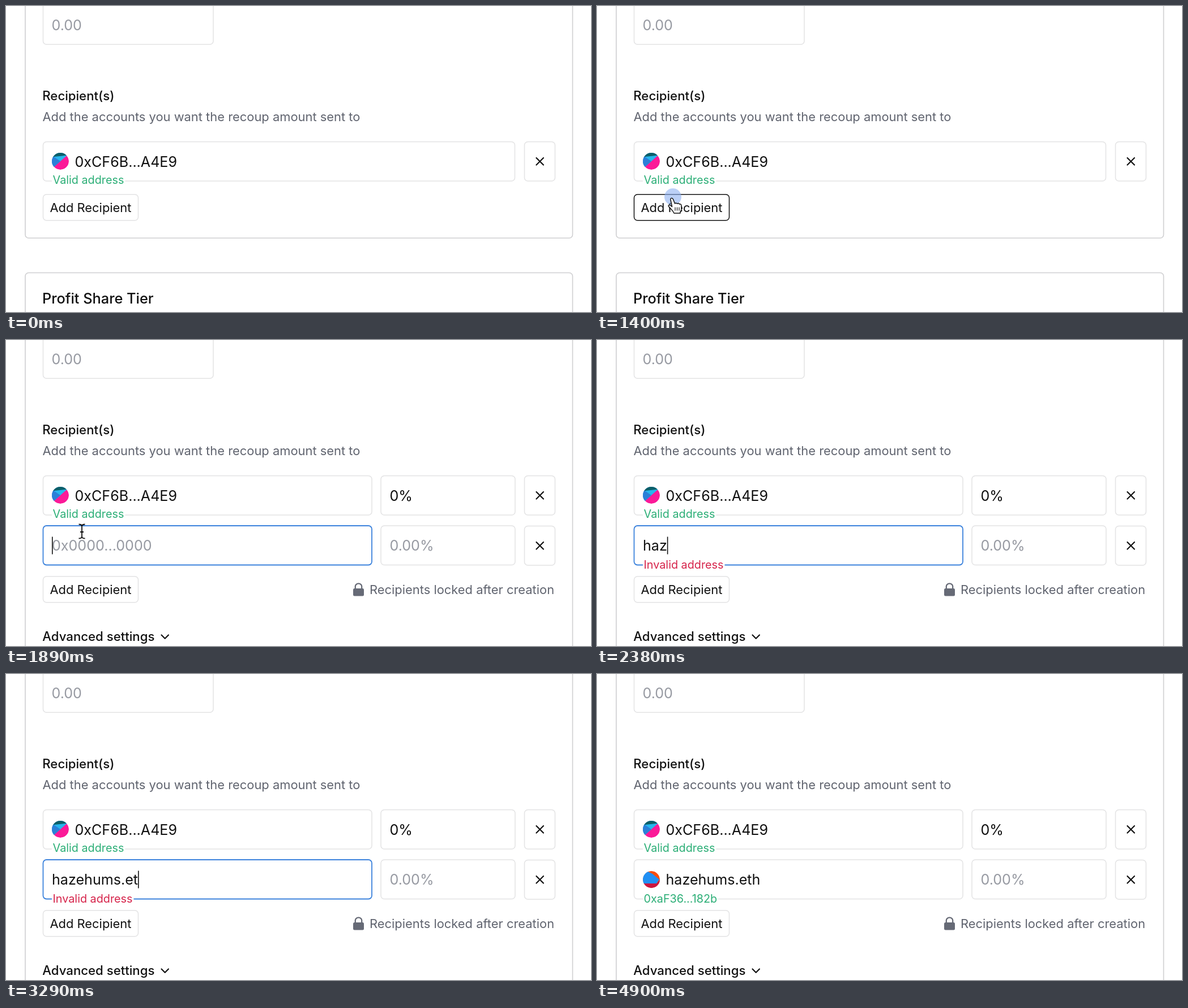
Animation, 1033 px wide and 542 px high, one loop 4.97 s. Source, as an HTML page:

```html
<!DOCTYPE html>
<html lang="en">
<head>
<meta charset="utf-8">
<title>Add recipient</title>
<style>
  html, body { margin: 0; width: 100%; height: 100%; overflow: hidden; background: #fff; }
  svg { display: block; width: 100%; height: 100%; font-family: Inter, sans-serif; }
  text { white-space: pre; fill: #111; }
  .body { font-size: 21.9px; }
  .input { font-size: 25.1px; }
  .label { font-size: 22.2px; font-weight: 500; }
  .title { font-size: 25.3px; font-weight: 500; }
  .hint { font-size: 19.8px; }
  .muted { fill: #60646f; }
  .placeholder { fill: #989ba3; }
  .box { fill: #fff; stroke: #e3e3e4; stroke-width: 1.5; }
  .card { fill: none; stroke: #cfcfd1; stroke-width: 1.6; }
  .icon { fill: none; stroke: #111; stroke-width: 2.2; stroke-linecap: round; stroke-linejoin: round; }
</style>
</head>
<body>
<svg id="stage" viewBox="0 0 1033 542" preserveAspectRatio="none">
  <defs>
    <clipPath id="disc"><circle r="15"/></clipPath>
  </defs>
</svg>
<script>
const LOOP = 4970, STEP = 70;
const NAME = 'hazehums.eth';
const ENTER = 700, ARRIVE = 1190, PRESS = 1330, RELEASE = 1540;
const TYPE_START = 2100, KEY_TIME = 114, RESOLVED = 3640;
const GREEN = '#2bae76', RED = '#d6244b', BLUE = '#3b82dc';

const stage = document.getElementById('stage');

function add(parent, tag, attrs = {}, content) {
  const node = document.createElementNS('http://www.w3.org/2000/svg', tag);
  for (const key in attrs) node.setAttribute(key, attrs[key]);
  if (content !== undefined) node.textContent = content;
  parent.append(node);
  return node;
}
const group = (parent = stage, x = 0, y = 0) => add(parent, 'g', { transform: `translate(${x} ${y})` });
const text = (parent, x, y, style, content) => add(parent, 'text', { x, y, class: style }, content);
const box = (parent, x, y, width, height, style = 'box') =>
  add(parent, 'rect', { x, y, width, height, rx: 6, class: style });
const show = (node, visible) => node.setAttribute('display', visible ? 'inline' : 'none');

function removeButton(parent, y) {
  box(parent, 915.5, y, 54, 69.5);
  add(parent, 'path', { d: `M936.5 ${y + 28.5}l12.5 12.5m0 -12.5l-12.5 12.5`, class: 'icon' });
}

function avatar(parent, x, y, base, shapes) {
  const disc = add(group(parent, x, y), 'g', { 'clip-path': 'url(#disc)' });
  add(disc, 'circle', { r: 15, fill: base });
  for (const [d, fill] of shapes) add(disc, 'path', { d, fill });
}

// A status line that interrupts the lower border of its input.
function hint(parent, y) {
  const cover = add(parent, 'rect', { x: 81, y: y - 12, height: 14, fill: '#fff' });
  const label = text(parent, 82.5, y, 'hint', '');
  return (content, color) => {
    label.textContent = content;
    label.style.fill = color;
    cover.setAttribute('width', content ? label.getComputedTextLength() + 3.5 : 0);
  };
}

function addButton(parent, y) {
  const frame = box(parent, 65.5, y, 168, 46);
  text(parent, 77.5, y + 31.3, 'body', 'Add Recipient');
  return frame;
}

// Shared header and first recipient
box(stage, 65.5, -20, 300.5, 88);
text(stage, 80.5, 43, 'input placeholder', '0.00');
text(stage, 64.3, 166.7, 'label', 'Recipient(s)');
text(stage, 64.5, 203.9, 'body muted', 'Add the accounts you want the recoup amount sent to');
const firstInput = box(stage, 65.5, 240.5, 833, 69.5);
avatar(stage, 96, 275, '#fb1a98', [
  ['M-18 16L18 -16V-18H-18Z', '#27b6ee'],
  ['M-18 16L0 0L-13 -9H-18Z', '#2b80d8'],
  ['M-18 -6L-11 -8L18 -11V-18H-18Z', '#0c5f69']
]);
text(stage, 121.5, 284.5, 'input', '0xCF6B...A4E9');
hint(stage, 315.3)('Valid address', GREEN);
removeButton(stage, 240.5);

// One recipient
const single = group();
box(single, 34, -20, 966.5, 431, 'card');
box(single, 34, 472.5, 966.5, 100, 'card');
text(single, 64, 526.7, 'title', 'Profit Share Tier');
const hoverButton = addButton(single, 333.7);

// Two recipients
const double = group();
box(double, 34, -20, 966.5, 600, 'card');
box(double, 662, 240.5, 237, 69.5);
text(double, 677.5, 284.5, 'input', '0%');
const secondInput = box(double, 65.5, 329, 580.5, 69.5);
box(double, 662, 329, 237, 69.5);
text(double, 677.5, 373.3, 'input placeholder', '0.00%');
removeButton(double, 329.5);
addButton(double, 418.7);
text(double, 642, 450.2, 'body muted', 'Recipients locked after creation');
add(double, 'rect', { x: 613, y: 440, width: 19, height: 13.5, rx: 2.5, fill: '#666a76' });
add(double, 'path', { d: 'M616.8 441v-4.5a5.7 5.2 0 0 1 11.4 0v4.5', fill: 'none', stroke: '#666a76', 'stroke-width': 2.3 });
text(double, 64.3, 533.2, 'label', 'Advanced settings');
add(double, 'path', { d: 'M274.5 522.5l6.2 6.3l6.2 -6.3', class: 'icon' });

const resolvedIcon = group(double);
avatar(resolvedIcon, 96, 364, '#fa4d0b', [
  ['M-18 7H9L15 1L18 18H-18Z', '#cb1640'],
  ['M-18 -12L-6 -14L2 -10L14 0L9 7H-18Z', '#2190f3']
]);
const entry = text(double, 81, 373.3, 'input', '');
const setStatus = hint(double, 404.7);
const caret = add(double, 'rect', { y: 348.5, width: 1.6, height: 31, fill: '#111' });

// Pointer shapes, each with its hot spot at the origin
const pulse = add(stage, 'circle', { cx: 134, cy: 338, r: 15, fill: '#8db1f2', opacity: 0.6 });
const pointer = group();
const outline = { fill: '#fff', stroke: '#111', 'stroke-width': 1.5, 'stroke-linejoin': 'round' };
const arrow = add(pointer, 'path', { ...outline, fill: '#111', stroke: '#fff', d: 'M0 0V21L5 16.5L8.5 24.5L12 23L8.6 15.3H15.5Z' });
const hand = group(pointer);
add(hand, 'path', { ...outline, d: 'M-2.5 3C-3.5 -.5 .5 -1.5 2 2L5 9.5Q7 7.5 9 9.7Q11.5 8 13 10.5Q16 9.5 16.5 13V19Q16.5 22 14.5 24V26.5H3.5Q2 23 -1 20L-6 14.5Q-7.5 11 -3 12.5L0 15Z' });
add(hand, 'path', { d: 'M5.5 16v6m3.5 -6v6m3.5 -6v6', stroke: '#111', 'stroke-width': 1.2 });
const beam = add(stage, 'path', { fill: 'none', stroke: '#111', 'stroke-width': 1.8, d: 'M128.5 326.5q5.5 0 5.5 3.5q0 -3.5 5.5 -3.5M134 330v18M128.5 351.5q5.5 0 5.5 -3.5q0 3.5 5.5 3.5M131 340h6' });

function drawPointer(t) {
  const progress = Math.min(1, Math.max(0, (t - ENTER) / (ARRIVE - ENTER)));
  const left = (1 - progress) ** 3;
  const x = 132.5 + 190 * left, y = 340.5 + 215 * left;
  const hovering = x < 233 && y < 380;
  pointer.setAttribute('transform', `translate(${x} ${y})`);
  show(pointer, t >= ENTER && t < RELEASE);
  show(arrow, !hovering);
  show(hand, hovering);
  show(pulse, t >= PRESS && t < RELEASE);
  show(beam, t >= RELEASE && t < TYPE_START);
  hoverButton.style.stroke = hovering && t >= ENTER ? '#111' : '';
}

function drawEntry(t) {
  const resolved = t >= RESOLVED;
  const typed = NAME.slice(0, Math.max(0, Math.floor((t - TYPE_START) / KEY_TIME) + 1));
  entry.textContent = typed || '0x0000...0000';
  entry.setAttribute('class', typed ? 'input' : 'input placeholder');
  entry.setAttribute('x', resolved ? 121.5 : 81);
  show(resolvedIcon, resolved);
  secondInput.style.stroke = resolved ? '' : BLUE;
  secondInput.style.strokeWidth = resolved ? '' : 1.8;
  if (resolved) setStatus('0xaF36...182b', GREEN);
  else setStatus(typed ? 'Invalid address' : '', RED);
  const blinkOn = typed || (t - RELEASE) % 1000 < 500;
  caret.setAttribute('x', 81 + (typed ? entry.getComputedTextLength() : 0));
  show(caret, !resolved && blinkOn);
}

function draw(t) {
  const expanded = t >= RELEASE;
  show(single, !expanded);
  show(double, expanded);
  firstInput.setAttribute('width', expanded ? 580.5 : 833);
  drawPointer(t);
  if (expanded) drawEntry(t);
}

const start = performance.now();
function tick() {
  const t = (performance.now() - start) % LOOP;
  draw(Math.floor(t / STEP) * STEP);
  requestAnimationFrame(tick);
}
tick();
</script>
</body>
</html>
```
